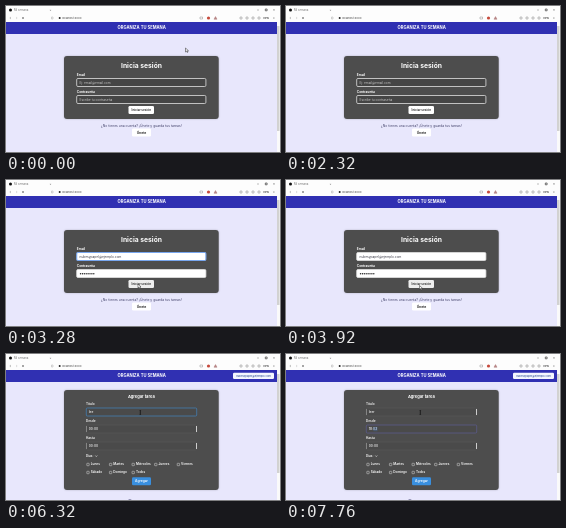
An HTML page with a canvas that plays this animation: 274 by 146 pixels, repeating every 8 s.

```html
<!DOCTYPE html>
<html lang="es">
<head>
<meta charset="utf-8">
<title>Organiza tu semana</title>
<style>
html, body { margin: 0; width: 100%; height: 100%; overflow: hidden; background: #e8e7fc; }
canvas { display: block; width: 274px; height: 146px; }
</style>
</head>
<body>
<canvas id="stage" width="274" height="146"></canvas>
<script>
const ctx = document.getElementById('stage').getContext('2d');
const LOOP = 8000;
const SANS = 'Inter, "Open Sans", sans-serif';
const EMAIL = 'nubesypapel@ejemplo.com';
const PAGE = '#e8e7fc';
const CARD = '#4d4d4d';
const BLUE = '#3030b2';

function box(x, y, w, h, fill, radius = 0, stroke, line = 0.7) {
  ctx.beginPath();
  ctx.roundRect(x, y, w, h, radius);
  if (fill) { ctx.fillStyle = fill; ctx.fill(); }
  if (stroke) { ctx.strokeStyle = stroke; ctx.lineWidth = line; ctx.stroke(); }
}

function card(y, h) {
  ctx.save();
  ctx.shadowColor = 'rgba(0, 0, 0, 0.25)';
  ctx.shadowBlur = 2;
  box(58, y, 154.7, h, CARD, 3);
  ctx.restore();
}

function dot(x, y, r, color) {
  ctx.fillStyle = color;
  ctx.beginPath();
  ctx.arc(x, y, r, 0, Math.PI * 2);
  ctx.fill();
}

function path(points, color, line = 0.6, fill) {
  ctx.beginPath();
  points.forEach(([x, y], i) => i ? ctx.lineTo(x, y) : ctx.moveTo(x, y));
  if (fill) { ctx.closePath(); ctx.fillStyle = fill; ctx.fill(); }
  ctx.strokeStyle = color;
  ctx.lineWidth = line;
  ctx.stroke();
}

function label(text, x, y, size, color, weight = 400, align = 'left') {
  ctx.font = `${weight} ${size}px ${SANS}`;
  ctx.textAlign = align;
  ctx.textBaseline = 'middle';
  ctx.fillStyle = color;
  ctx.fillText(text, x, y);
}

const ease = p => p * p * (3 - 2 * p);

// Position along timed stops: [ms, x, y]
function follow(stops, t) {
  if (t <= stops[0][0]) return stops[0].slice(1);
  for (let i = 1; i < stops.length; i++) {
    const [t0, x0, y0] = stops[i - 1], [t1, x1, y1] = stops[i];
    if (t < t1) {
      const p = ease((t - t0) / (t1 - t0));
      return [x0 + (x1 - x0) * p, y0 + (y1 - y0) * p];
    }
  }
  return stops[stops.length - 1].slice(1);
}

function browser() {
  box(0, 0, 274, 16, '#fdfdfd');
  dot(4.5, 4, 1.5, '#111');
  label('Mi semana', 8, 4, 2.8, '#777');
  label('×', 44.5, 4, 3, '#666', 400, 'center');
  path([[251, 4], [253, 4]], '#777', 0.5);
  box(259.3, 3, 1.8, 1.8, null, 0, '#222', 0.6);
  label('×', 268, 4, 3.6, '#555', 400, 'center');
  path([[5, 11], [3.8, 12], [5, 13]], '#888', 0.5);
  path([[10, 11], [11.2, 12], [10, 13]], '#bbb', 0.5);
  dot(17, 12, 1, '#888');
  box(45.5, 11, 1.5, 2, null, 0, '#999', 0.4);
  dot(53.7, 12, 1, '#222');
  label('localhost:3000', 56, 12, 2.7, '#555', 500);
  box(194, 11, 2.5, 2, null, 0, '#777', 0.4);
  dot(202.5, 12, 1.6, '#c64a3c');
  path([[208, 13.2], [209.5, 10.6], [211, 13.2]], '#a77', 0.5, '#b88');
  [234, 240, 246, 252].forEach(x => box(x, 11, 2, 2, null, 0.5, '#777', 0.5));
  label('VPN', 257, 12, 2.7, '#444', 600);
  label('≡', 268, 12, 3, '#666', 400, 'center');
}

function shell(thumb) {
  box(0, 16, 274, 130, PAGE);
  browser();
  box(0, 16, 271, 12, BLUE);
  label('ORGANIZA TU SEMANA', 135.7, 22, 4.15, '#fff', 700, 'center');
  box(271, 16, 3, 130, '#fafafa');
  box(271, 20, 2.5, thumb, '#d2d2d2');
}

function loginField(y, value, placeholder, focused) {
  box(70.7, y, 129.2, 8, value ? '#fff' : '#454545', 1.2, focused ? '#78a6ee' : '#e0e0e0', focused ? 1.1 : 0.8);
  label(value || placeholder, 73.5, y + 4.2, 3.2, value ? '#3c3c48' : '#c4c4c4');
}

function login(t) {
  const filled = t >= 2560;
  card(50, 63);
  label('Inicia sesión', 135.5, 60, 6.75, '#fff', 700, 'center');
  label('Email', 70.8, 69, 3.2, '#fff', 700);
  loginField(72.5, filled && EMAIL, 'Ej: email@email.com', t >= 2400 && t < 3600);
  label('Contraseña', 70.8, 85.7, 3.2, '#fff', 700);
  loginField(89.5, filled && ' ', 'Escribe tu contraseña', false);
  if (filled) {
    for (let i = 0; i < 8; i++) dot(74.5 + i * 1.9, 93.7, 0.7, '#222');
  }
  box(122.5, 100, 25.5, 8, t >= 3280 ? '#eee' : '#fff', 1.3);
  label('Iniciar sesión', 135.3, 104, 3.05, '#222', 600, 'center');
  label('¿No tienes una cuenta? ¡Únete y guarda tus tareas!', 135.4, 120, 3.35, '#44446c', 400, 'center');
  box(126, 122.5, 19, 8, '#fff', 1.3);
  label('Únete', 135.5, 126.5, 3.4, '#222', 600, 'center');
}

function taskField(y, text, color, focusColor) {
  box(80.3, y, 110.4, 8, '#4a4a4a', 1, focusColor || '#565656', 0.7);
  if (!focusColor) {
    path([[80.5, y + 1], [80.5, y + 7]], '#aaa', 0.6);
    path([[190.5, y + 1], [190.5, y + 7]], '#eee', 0.8);
  }
  label(text, 82.8, y + 4.2, 3.2, color, 500);
}

function day(name, x, y) {
  box(x, y - 1.2, 2.4, 2.4, CARD, 0.4, '#ddd', 0.5);
  label(name, x + 3.9, y, 3.15, '#fff', 600);
}

function planner(t) {
  box(227, 18.7, 41, 6.3, '#f5f7ff', 1.2);
  label(EMAIL, 247.5, 22, 2.6, '#34509a', 500, 'center');

  card(36, 100);
  label('Agregar tarea', 135.3, 43, 4, '#fff', 700, 'center');

  label('Título', 80, 50, 3.1, '#fff', 600);
  const letters = t < 6080 ? 0 : t < 6160 ? 1 : t < 6320 ? 2 : t < 6480 ? 3 : 4;
  const titleFocus = t >= 5600 && t < 7040;
  taskField(54, letters ? 'leer'.slice(0, letters) : 'Ej: Lavar los platos', letters ? '#fff' : '#c4c4c4', titleFocus && '#4385bd');

  label('Desde', 80, 67, 3.1, '#fff', 600);
  const start = t < 7360 ? '00:00' : t < 7520 ? '01:00' : t < 7760 ? '18:00' : '18:03';
  const timeFocus = t >= 7040;
  taskField(71, start, '#fff', timeFocus && '#5c5c92');
  if (timeFocus) box(t < 7520 ? 82.5 : 87.3, 73, 4.2, 4.2, 'rgba(70, 130, 220, 0.25)');

  label('Hasta', 80, 84, 3.1, '#fff', 600);
  taskField(88, '00:00', '#fff');

  label('Días:', 80, 102, 3.1, '#fff', 600);
  path([[89.3, 101.5], [90.3, 102.6], [91.3, 101.5]], '#eee', 0.6);
  ['Lunes', 'Martes', 'Miércoles', 'Jueves', 'Viernes'].forEach((name, i) => day(name, 80.8 + i * 22.6, 110.5));
  ['Sábado', 'Domingo', 'Todos'].forEach((name, i) => day(name, 80.8 + i * 22.6, 118.5));
  box(126, 123.2, 19, 8, '#398fdf', 1.3);
  label('Agregar', 135.5, 127.3, 3.3, '#fff', 600, 'center');

  if (t < 4640) {
    ctx.beginPath();
    ctx.arc(136, 142.7, 2.1, -2, 2);
    ctx.strokeStyle = '#222244';
    ctx.lineWidth = 0.8;
    ctx.stroke();
  } else {
    label('Tu semana', 135.5, 147.4, 5, '#77779d', 600, 'center');
  }
}

function arrow(x, y) {
  path([[x, y], [x, y + 4], [x + 1, y + 3.1], [x + 1.7, y + 4.5],
    [x + 2.4, y + 4.1], [x + 1.8, y + 2.8], [x + 3, y + 2.8], [x, y]], '#222', 0.5, '#fff');
}

function beam(x, y) {
  path([[x - 0.8, y - 2], [x + 0.8, y - 2]], '#111', 0.5);
  path([[x, y - 2], [x, y + 2]], '#111', 0.8);
  path([[x - 0.8, y + 2], [x + 0.8, y + 2]], '#111', 0.5);
}

const loginRoute = [
  [1440, 179.5, 42], [2160, 141, 78], [2720, 141, 78],
  [3120, 134, 91], [3280, 132, 104], [3440, 133.5, 105.5]
];
const plannerRoute = [[4880, 133, 106], [5360, 134.3, 58.5]];

function pointer(t) {
  const typing = t >= 2320 && t < 2720;
  if (typing) return;
  const [x, y] = follow(t < 4560 ? loginRoute : plannerRoute, t);
  const overField = t < 4560
    ? y > 72 && y < 81 || y > 89 && y < 98
    : y < 63;
  (overField ? beam : arrow)(x, y);
}

function draw() {
  const t = Math.floor((performance.now() % LOOP) / 80) * 80;
  shell(t < 4640 ? 105 : 99);
  (t < 4560 ? login : planner)(t);
  pointer(t);
  requestAnimationFrame(draw);
}
draw();
</script>
</body>
</html>
```
